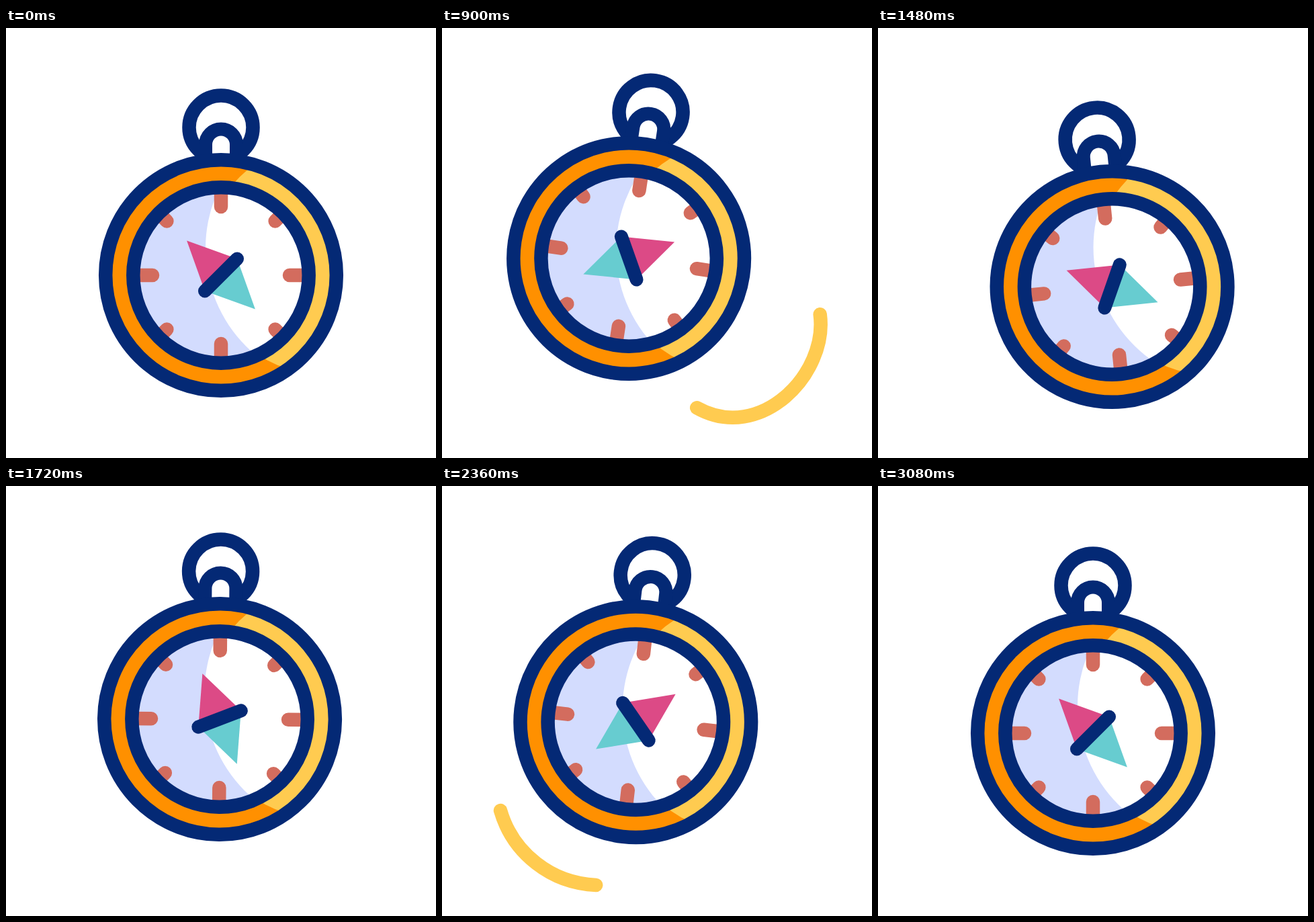
An HTML page that plays this animation: 640 by 640 pixels, repeating every 3160 ms.

```html
<!DOCTYPE html>
<html lang="en">
<head>
<meta charset="utf-8">
<title>Swinging compass</title>
<style>
  html, body { margin: 0; width: 100%; height: 100%; overflow: hidden; background: #fff; }
  svg { display: block; width: 100%; height: 100%; }
  .navy { fill: none; stroke: #042975; stroke-width: 20.5; stroke-linecap: round; }
  .trail { fill: none; stroke: #ffcb50; stroke-width: 20.5; stroke-linecap: round; }
  .tick { stroke: #d36c5e; stroke-width: 20.5; stroke-linecap: round; }
</style>
</head>
<body>
<svg viewBox="0 0 640 640">
  <defs>
    <clipPath id="rim"><circle cx="320" cy="368" r="170"/></clipPath>
    <clipPath id="face"><circle cx="320" cy="368" r="130"/></clipPath>
  </defs>
  <path id="trailA" class="trail" pathLength="1" d="M562 422C578 512 474 621 377 564"/>
  <path id="trailB" class="trail" pathLength="1" d="M87 483A154 154 0 0 0 292 583"/>
  <g id="body">
    <circle class="navy" cx="320" cy="148" r="47.5"/>
    <path class="navy" style="fill:#fff;stroke-width:20" d="M297 196V173.500A23 23 0 0 1 343 173.500V196"/>
    <g clip-path="url(#rim)">
      <circle cx="320" cy="368" r="170" fill="#ff9000"/>
      <circle cx="469" cy="343" r="171.500" fill="#ffcb50"/>
    </g>
    <g clip-path="url(#face)">
      <circle cx="320" cy="368" r="130" fill="#d3dcfe"/>
      <circle cx="503" cy="328" r="206" fill="#fff"/>
      <g id="ticks"></g>
    </g>
    <circle class="navy" cx="320" cy="368" r="171.800"/>
    <circle class="navy" cx="320" cy="368" r="130.700"/>
    <g id="needle">
      <path fill="#dc4a86" d="M0-72L34 0H-34Z"/>
      <path fill="#67ccd0" d="M0 72L34 0H-34Z"/>
      <path class="navy" style="stroke-width:20" d="M-34 0H34"/>
    </g>
  </g>
</svg>
<script>
const LOOP = 3160, STEP = 20;
const el = id => document.getElementById(id);

// [time, value] keys
const lift = [[200, 0], [560, -26.5], [730, -34.5], [900, -21.9], [1220, 10], [1390, 24.5],
  [1720, -21], [1820, -29.5], [1910, -34.5], [2360, -15], [2800, 14], [3080, 0]];
const swing = [[330, 0], [560, 3.5], [740, 8], [830, 9.25], [900, 8.6], [1220, -2.1], [1430, -6.2],
  [1720, 0.4], [1820, 3.8], [2060, 9.2], [2360, 6.5], [2910, -4.1], [3080, 0]];
const spin = [[200, 0], [560, 61.7], [830, 113], [900, 106.9], [1220, 24.1], [1470, -20],
  [1720, 23.7], [2090, 115], [2360, 93.9], [2910, -10], [3080, 0]];

function slope(keys, i) {
  const a = keys[i - 1], b = keys[i], c = keys[i + 1];
  if (!a || !c || (b[1] - a[1]) * (c[1] - b[1]) <= 0) return 0;
  return (c[1] - a[1]) / (c[0] - a[0]);
}

// Smooth curve through the keys, flat at each turning point
function curve(keys, t) {
  const last = keys.length - 1;
  if (t <= keys[0][0]) return keys[0][1];
  if (t >= keys[last][0]) return keys[last][1];
  const i = keys.findIndex(k => k[0] > t) - 1;
  const [t0, v0] = keys[i], [t1, v1] = keys[i + 1];
  const d = t1 - t0, u = (t - t0) / d, w = 1 - u;
  return w * w * ((1 + 2 * u) * v0 + u * d * slope(keys, i))
    + u * u * ((3 - 2 * u) * v1 - w * d * slope(keys, i + 1));
}

function ease(t, from, to) {
  const u = Math.min(1, Math.max(0, (t - from) / (to - from)));
  return (1 - Math.cos(Math.PI * u)) / 2;
}

function trim(path, start, end) {
  const length = end - start;
  path.style.display = length > 0.002 ? "" : "none";
  path.setAttribute("stroke-dasharray", `${length} 3`);
  path.setAttribute("stroke-dashoffset", -start);
}

function draw(t) {
  el("body").setAttribute("transform",
    `translate(0 ${curve(lift, t)}) rotate(${curve(swing, t)} 320 88)`);
  el("needle").setAttribute("transform",
    `translate(320 367.5) rotate(${curve(spin, t) - 45})`);
  trim(el("trailA"), ease(t, 870, 1255), ease(t, 270, 940));
  trim(el("trailB"), ease(t, 2480, 2955), ease(t, 1980, 2550));
}

for (let i = 0; i < 8; i++) {
  const inner = i % 2 ? 114 : 102;
  el("ticks").insertAdjacentHTML("beforeend",
    `<path class="tick" d="M0 ${-inner}V-135" transform="translate(320 368) rotate(${i * 45})"/>`);
}

const begin = performance.now();
function tick() {
  const t = (performance.now() - begin) % LOOP;
  draw(Math.floor(t / STEP) * STEP);
  requestAnimationFrame(tick);
}
tick();
</script>
</body>
</html>
```
